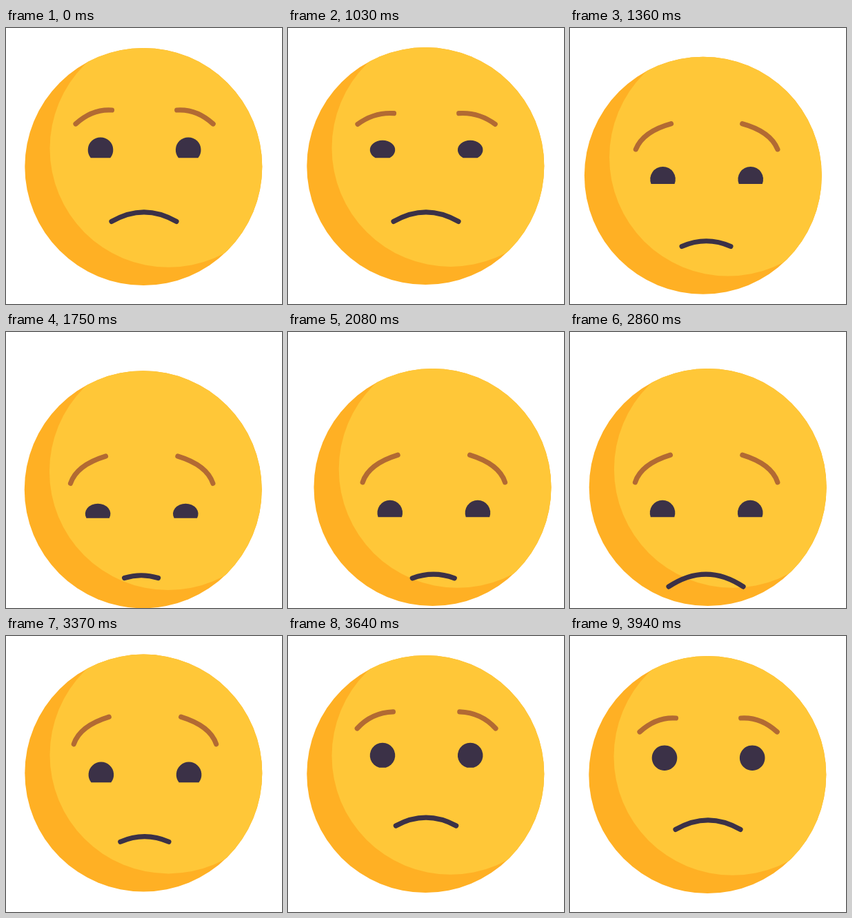
Recreate the animation shown at these times as an HTML page. Size 400 by 400 pixels, loop 3.97 s.

```html
<!DOCTYPE html>
<html lang="en">
<head>
<meta charset="utf-8">
<title>Sad face</title>
<style>
  html, body { margin: 0; width: 100%; height: 100%; overflow: hidden; background: #fff; }
  svg { display: block; width: 100%; height: 100%; }
  .line { fill: none; stroke-width: 7.2; stroke-linecap: round; stroke-linejoin: round; }
  .brow { stroke: #b26a33; }
  .mouth { stroke: #3b3147; }
  .eye { fill: #3b3147; }
</style>
</head>
<body>
<svg viewBox="0 0 400 400">
  <defs><clipPath id="disc"><circle r="172"/></clipPath></defs>
  <g id="head">
    <circle r="172" fill="#ffb024"/>
    <circle cx="36.2" cy="-26.2" r="172" fill="#ffc738" clip-path="url(#disc)"/>
  </g>
  <g id="face">
    <path class="line brow" id="browL"/>
    <path class="line brow" id="browR"/>
    <path class="eye" id="eyeL"/>
    <path class="eye" id="eyeR"/>
    <path class="line mouth" id="mouth"/>
  </g>
</svg>
<script>
const LOOP = 3970;
const MID = 200.6;
const EYE_R = 18.3;
const SWING_START = 1490, SWING_HALF = 545, SWING_END = SWING_START + 3 * SWING_HALF;
const LAG_X = 70, LAG_Y = 25;

const $ = id => document.getElementById(id);
const mix = (a, b, k) => a + (b - a) * k;
const clamp = (v, lo, hi) => Math.min(hi, Math.max(lo, v));

// Eased 0 to 1 between two times.
const ramp = (t, from, to) => (1 - Math.cos(Math.PI * clamp((t - from) / (to - from), 0, 1))) / 2;
// Rises from a to b, holds, falls from c to d.
const pulse = (t, a, b, c, d) => ramp(t, a, b) - ramp(t, c, d);
const hump = (t, from, to) => pulse(t, from, (from + to) / 2, (from + to) / 2, to);

// Side to side shake: a triangle wave with rounded turns.
function swing(t) {
  const turn = Math.PI * (clamp(t, SWING_START, SWING_END) - SWING_START) / SWING_HALF;
  const wave = -Math.asin(0.95 * Math.cos(turn)) / Math.asin(0.95);
  return 11 * wave * pulse(t, 1200, SWING_START, SWING_END, 3340);
}

const lift = t => pulse(t, 1000, 1170, 3470, 3720);
const down = t => pulse(t, 1170, 1480, 3170, 3470);
const dip = t => hump(t, 1480, 2040);
const settle = t => hump(t, 3580, 3910);

function setPath(id, d) { $(id).setAttribute("d", d); }
function move(id, x, y) { $(id).setAttribute("transform", `translate(${x} ${y})`); }

// Brow points are measured outwards from the middle of the face.
function brow(id, side, up, drop) {
  const x = (a, b) => MID + side * mix(a, b, up);
  const y = (a, b, d) => mix(a, b, up) + d;
  setPath(id, `M${x(99.6, 103.2)} ${y(139, 132.5, drop * 0.1)}
    Q${x(75.6, 94.6)} ${y(117, 106, drop)} ${x(47.1, 52.2)} ${y(119, 93, drop)}`);
}

// An ellipse cut flat below by the lower lid.
function eye(id, cx, ry, lid) {
  const cy = 176.7;
  const cut = Math.min(lid, ry * 0.9999);
  const w = EYE_R * Math.sqrt(1 - (cut / ry) ** 2);
  setPath(id, `M${cx - w} ${cy + cut}A${EYE_R} ${ry} 0 1 1 ${cx + w} ${cy + cut}Z`);
}

function mouth(w, top) {
  const sag = w * w / 162;
  setPath("mouth", `M${200 - w} ${top + sag}Q200 ${top - sag} ${200 + w} ${top + sag}`);
}

function draw(t) {
  move("head", 199.3 + swing(t),
    201 - 11 * lift(t) + 35 * down(t) + 3.3 * dip(t) + 5 * settle(t));

  // The features trail the head.
  const late = t - LAG_Y;
  move("face", swing(t - LAG_X),
    -11 * lift(late) + 96.3 * down(late) + 1.7 * dip(late) + 4 * settle(late));

  const raised = pulse(t, 1060, 1450, 3370, 3760);
  const frown = 9 * pulse(t, 1000, 1060, 1100, 1320);
  brow("browL", -1, raised, frown);
  brow("browR", 1, raised, frown);

  const blink = 16.3 * pulse(t, 1000, 1090, 1110, 1270) + 3.3 * hump(t, 1620, 1880);
  const lid = 11.5 - 5.3 * pulse(t, 1030, 1450, 3180, 3400) + 6.8 * ramp(t, 3400, 3700);
  eye("eyeL", MID - 63.6, EYE_R - blink, lid);
  eye("eyeR", MID + 63.6, EYE_R - blink, lid);

  const purse = 22.5 * pulse(t, 1060, 1650, 1750, 2860) + 12 * hump(t, 2900, 3800);
  const stretch = 7 * pulse(t, 1750, 2860, 2860, 3370);
  mouth(47 - purse + stretch, 266.8 - down(late));
}

const begin = performance.now();
function tick() {
  draw((performance.now() - begin) % LOOP);
  requestAnimationFrame(tick);
}
tick();
</script>
</body>
</html>
```
